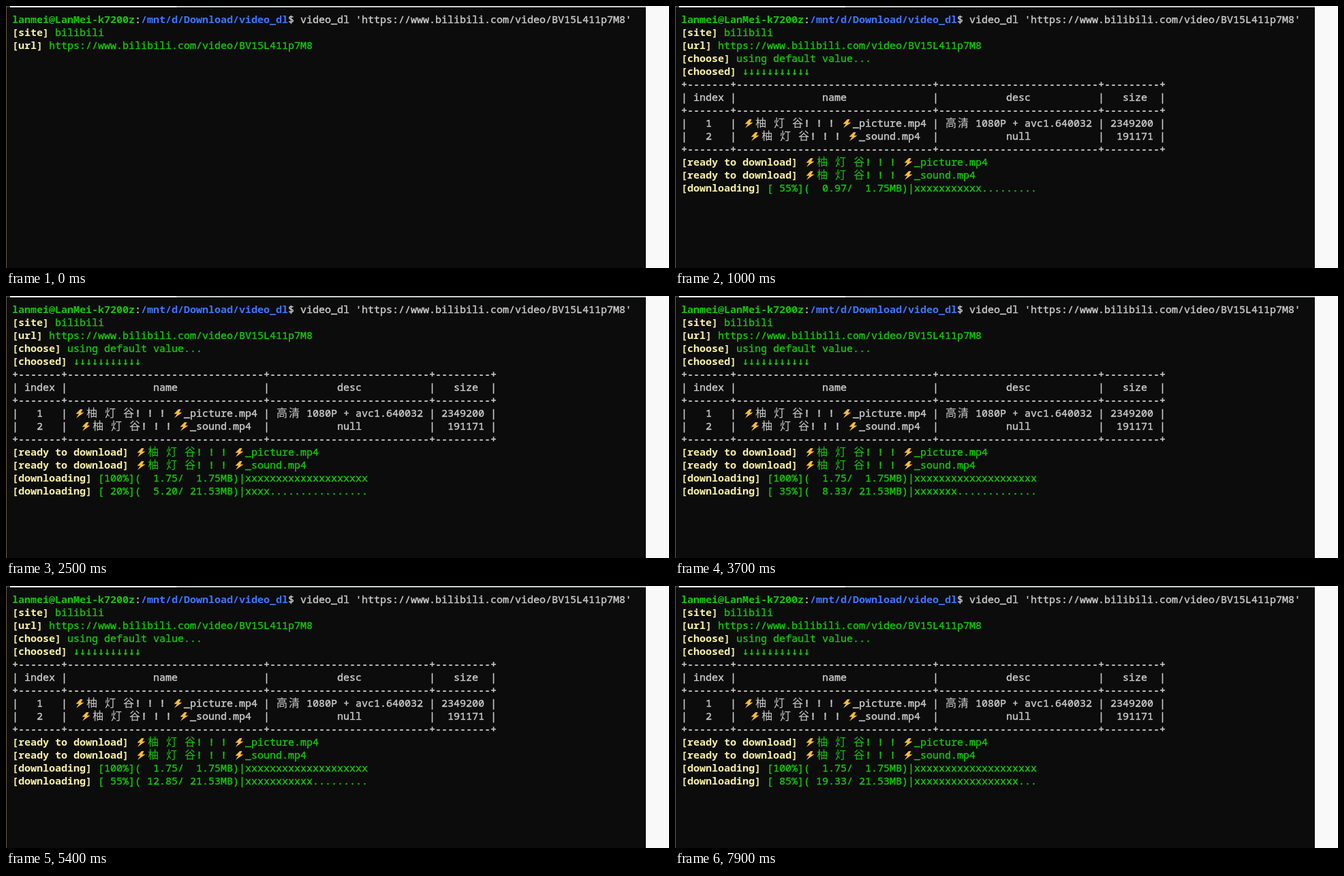
An HTML page that plays this animation: 973x384 px, repeating every 8 s.

```html
<!DOCTYPE html>
<html lang="zh-CN">
<head>
<meta charset="utf-8">
<title>Terminal download</title>
<style>
  html, body { margin: 0; width: 100%; height: 100%; overflow: hidden; background: #0c0c0c; }
  svg { display: block; }
  text { white-space: pre; font: 400 15px "Noto Sans Mono", "DejaVu Sans Mono", monospace; font-variant-ligatures: none; stroke-width: .4px; }
  .bold { font-weight: 700; stroke: none; }
  .arrows { font-family: "DejaVu Sans Mono", monospace; font-size: 14.95px; }
  .cjk { font: 400 16px "Noto Sans CJK SC", "Noto Sans CJK", sans-serif; text-anchor: middle; }
</style>
</head>
<body>
<svg id="stage" width="973" height="384" viewBox="0 0 973 384">
  <rect width="973" height="384" fill="#0c0c0c"/>
  <rect width="939" height="2" fill="#c6cac9"/>
  <rect x="6" width="244" height="2" fill="#fdfdfd"/>
  <rect width="6" height="2" fill="#3a3a3c"/>
  <rect width="1" height="384" fill="#6b5b45"/>
  <rect x="939" width="34" height="384" fill="#f9f9f9"/>
</svg>
<script>
const NS = "http://www.w3.org/2000/svg";
const CELL = 9, LINE = 19, LEFT = 9, BASE = 25;
const GREEN = "#16c60c", YELLOW = "#f9f1a5", BLUE = "#3b78ff", GREY = "#cccccc";
const LOOP = 8000, TICK = 100;
const stage = document.getElementById("stage");

function add(parent, tag, attrs) {
  const el = document.createElementNS(NS, tag);
  for (const key in attrs) el.setAttribute(key, attrs[key]);
  parent.appendChild(el);
  return el;
}
const group = () => add(stage, "g", {});
const colX = col => LEFT + col * CELL;
const rowY = row => BASE + row * LINE;

// The thin stroke gives the text its medium weight.
function put(parent, row, col, str, fill, style = "") {
  const el = add(parent, "text", { x: colX(col), y: rowY(row), fill, stroke: fill, class: style });
  el.textContent = str;
  return el;
}

// Wide characters take two cells each.
function putWide(parent, row, col, str, fill) {
  [...str].forEach((ch, i) => {
    const el = add(parent, "text", { x: colX(col + 2 * i) + 9, y: rowY(row), fill, class: "cjk" });
    el.textContent = ch;
  });
}

function bolt(parent, row, col) {
  add(parent, "path", {
    transform: `translate(${colX(col)} ${rowY(row) - 13})`,
    d: "M10 2H13.5L11 6.8H15.5L4 15L8 8.8H3.5Z",
    fill: "#fdbb3a"
  });
}

function fileName(parent, row, col, suffix, fill) {
  bolt(parent, row, col);
  ["柚", "灯", "谷"].forEach((ch, i) => putWide(parent, row, col + 2 + 3 * i, ch, fill));
  for (let i = 0; i < 3; i++) put(parent, row, col + 10 + 2 * i, "!", fill);
  bolt(parent, row, col + 16);
  put(parent, row, col + 18, suffix, fill);
}

function entry(parent, row, label, value, style) {
  put(parent, row, 0, `[${label}]`, YELLOW, "bold");
  return put(parent, row, label.length + 3, value, GREEN, style);
}

const head = group();
put(head, 0, 0, "lanmei@LanMei-k7200z", GREEN, "bold");
put(head, 0, 20, ":", GREY);
put(head, 0, 21, "/mnt/d/Download/video_dl", BLUE, "bold");
put(head, 0, 45, "$ video_dl 'https://www.bilibili.com/video/BV15L411p7M8'", GREY);
entry(head, 1, "site", "bilibili");
entry(head, 2, "url", "https://www.bilibili.com/video/BV15L411p7M8");

const list = group();
entry(list, 3, "choose", "using default value...");
entry(list, 4, "choosed", "↓".repeat(11), "arrows");
const rule = "+" + [7, 32, 26, 9].map(n => "-".repeat(n) + "+").join("");
for (const row of [5, 7, 10]) put(list, row, 0, rule, GREY, "bold");
for (const row of [6, 8, 9])
  for (const col of [0, 8, 41, 68, 78]) put(list, row, col, "|", GREY);

const cells = [
  [6, 2, "index"], [6, 23, "name"], [6, 53, "desc"], [6, 72, "size"],
  [8, 4, "1"], [8, 48, "1080P + avc1.640032"], [8, 70, "2349200"],
  [9, 4, "2"], [9, 53, "null"], [9, 71, "191171"]
];
for (const [row, col, str] of cells) put(list, row, col, str, GREY);
putWide(list, 8, 43, "高清", GREY);
fileName(list, 8, 10, "_picture.mp4", GREY);
fileName(list, 9, 11, "_sound.mp4", GREY);
entry(list, 11, "ready to download", "");
fileName(list, 11, 20, "_picture.mp4", GREEN);
entry(list, 12, "ready to download", "");
fileName(list, 12, 20, "_sound.mp4", GREEN);

// Each download: total in MB and [time, MB done] points.
function download(row, total, points) {
  const box = group();
  return { box, total, points, out: entry(box, row, "downloading", "") };
}
const downloads = [
  download(13, 1.75, [[300, 0.04], [700, 0.45], [1000, 0.97], [1300, 1.75]]),
  download(14, 21.53, [[1400, 0.32], [1700, 2.4], [2000, 3.89], [2500, 5.2], [3700, 8.33],
    [3800, 8.62], [4400, 10.23], [6300, 15.2], [7900, 19.33]])
];

function valueAt(points, t) {
  for (let i = 1; i < points.length; i++) {
    const [t0, v0] = points[i - 1], [t1, v1] = points[i];
    if (t <= t1) return v0 + (v1 - v0) * (t - t0) / (t1 - t0);
  }
  return points[points.length - 1][1];
}

const mb = v => v.toFixed(2).padStart(6);

function progress(done, total) {
  const steps = Math.floor(20 * done / total + 1e-6);
  const percent = String(steps * 5).padStart(3);
  return `[${percent}%](${mb(done)}/${mb(total)}MB)|` + "x".repeat(steps) + ".".repeat(20 - steps);
}

const show = (el, on) => el.setAttribute("visibility", on ? "visible" : "hidden");

function draw(time) {
  const t = Math.floor((time % LOOP) / TICK) * TICK;
  show(list, t >= 100);
  for (const { box, total, points, out } of downloads) {
    const on = t >= points[0][0];
    show(box, on);
    if (!on) continue;
    const str = progress(valueAt(points, t), total);
    if (out.textContent !== str) out.textContent = str;
  }
}

const start = performance.now();
function loop() {
  draw(performance.now() - start);
  requestAnimationFrame(loop);
}
loop();
</script>
</body>
</html>
```
